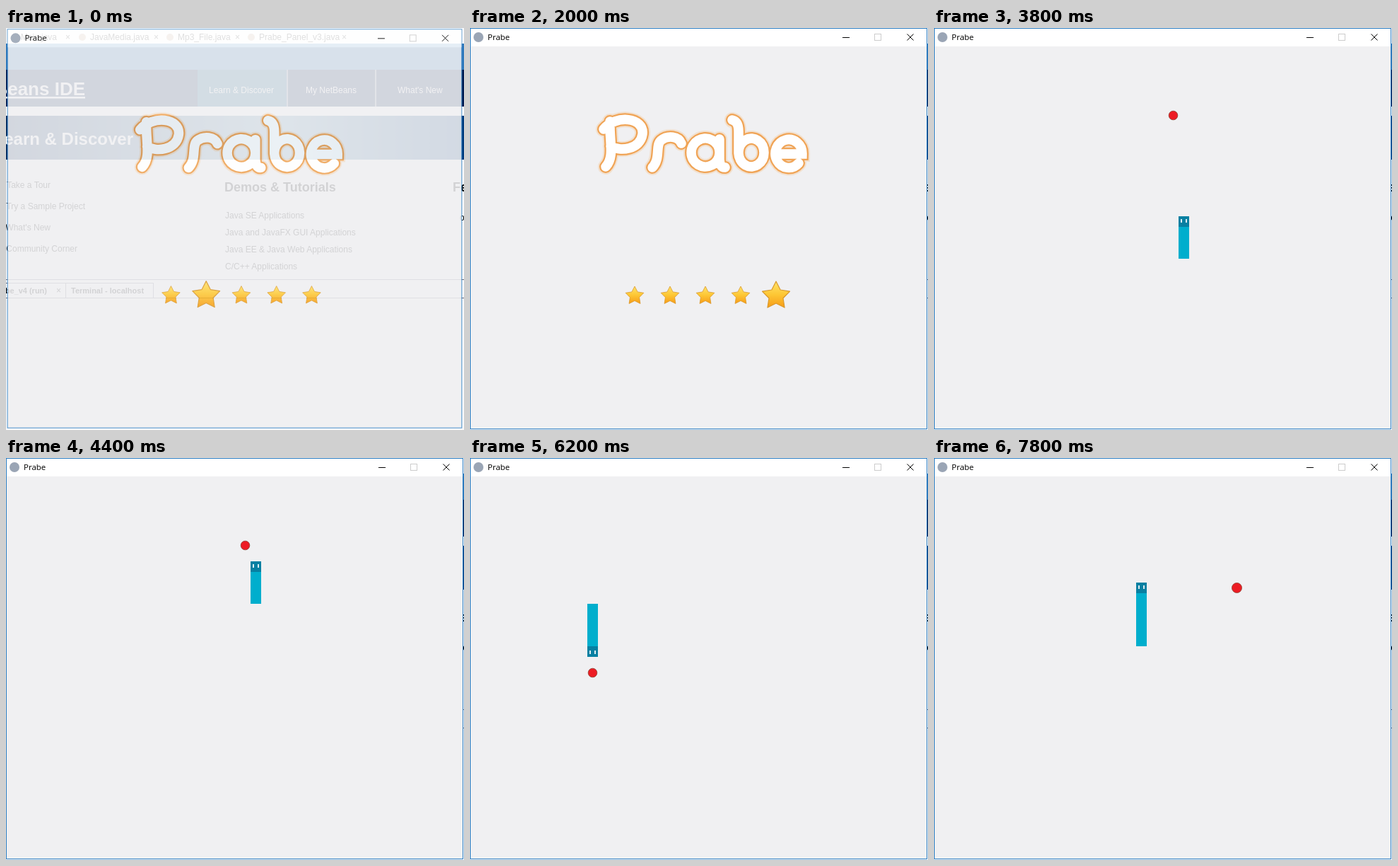
Recreate the animation shown at these times as an HTML page. Size 648 by 568 pixels, loop 8000 ms.

```html
<!DOCTYPE html>
<html lang="en">
<head>
<meta charset="utf-8">
<title>Prabe</title>
<style>
  html, body { margin: 0; width: 100%; height: 100%; overflow: hidden; }
  svg { display: block; width: 648px; height: 568px; }
  #desktop { font: 12px "Liberation Sans", Arial, sans-serif; }
  .bold { font-weight: bold; }
  .caption { font: 11.5px "Open Sans", "Noto Sans", sans-serif; }
  #logo path { fill: none; stroke-linecap: round; stroke-linejoin: round; }
</style>
</head>
<body>
<svg viewBox="0 0 648 568">
  <defs>
    <linearGradient id="gold" x2="0" y2="1">
      <stop offset="0" stop-color="#ffe36a"/>
      <stop offset=".5" stop-color="#fdc735"/>
      <stop offset="1" stop-color="#f79c17"/>
    </linearGradient>
    <linearGradient id="banner">
      <stop offset="0" stop-color="#00265a"/>
      <stop offset=".6" stop-color="#5c93b4"/>
      <stop offset="1" stop-color="#003a7c"/>
    </linearGradient>
    <path id="letters" d="M192 196C205 182 197 160 198 132M189 143C206 122 247 126 244 150C241 172 212 175 199 167
      M258 197C270 185 262 166 270 159C280 151 295 153 299 163
      M353 177A20 20 0 1 1 353 175M353 157V186Q354 198 361 197
      M371 130Q380 132 380 146V177A18 20 0 1 0 380 175
      M434 178H470A19 20 0 1 0 465 191"/>
    <path id="star"/>
  </defs>

  <g id="desktop">
    <rect width="648" height="568" fill="#f7f8fa"/>
    <rect y="22" width="648" height="37" fill="#2f78bb"/>
    <rect y="59" width="648" height="52" fill="#001a50"/>
    <rect x="271" y="59" width="126" height="52" fill="#085a82"/>
    <path d="M398 59v52M523 59v52" stroke="#fff"/>
    <rect y="111" width="648" height="13" fill="#fff"/>
    <rect y="124" width="648" height="62" fill="url(#banner)"/>
    <path d="M0 355.5H648M0 381.5H648M84.5 360V381M208.5 360V381M0 360.5H208" stroke="#667"/>
    <g id="page"></g>
  </g>

  <g id="window">
    <rect x=".5" y=".5" width="646" height="566" fill="#f0f0f2" stroke="#2d7fc4"/>
    <rect x="1" y="1" width="645" height="25" fill="#fff"/>
    <circle cx="12" cy="13" r="7" fill="#9aa5b5"/>
    <text class="caption" x="25" y="17">Prabe</text>
    <g fill="none" stroke="#000">
      <path d="M527 13.5h10M618.5 8.5l9 9M627.5 8.5l-9 9"/>
      <rect x="572.5" y="8.5" width="9" height="9" stroke="#ccc"/>
    </g>
    <g id="splash">
      <g id="logo">
        <use href="#letters" stroke="#f7b15f" stroke-opacity=".25" stroke-width="22" fill="none" stroke-linecap="round"/>
        <use href="#letters" stroke="#f0a456" stroke-width="18" fill="none" stroke-linecap="round"/>
        <use href="#letters" stroke="#fff" stroke-width="13.5" fill="none" stroke-linecap="round"/>
      </g>
      <g id="stars"></g>
    </g>
    <g id="game">
      <circle id="food" r="6.5" fill="#ed1c24" stroke="#8c3a2c" stroke-width=".8"/>
      <g id="body" fill="#00aecd"></g>
      <g id="head">
        <rect x="-7.5" y="-7.5" width="15" height="15" fill="#0780a2"/>
        <path d="M-1.5 -3.5h5M-1.5 3.5h5" stroke="#fff" stroke-width="1.7"/>
      </g>
    </g>
  </g>
</svg>

<script>
const $ = id => document.getElementById(id);
const add = (parent, name, attrs, text = "") => {
  const node = document.createElementNS("http://www.w3.org/2000/svg", name);
  for (const key in attrs) node.setAttribute(key, attrs[key]);
  node.textContent = text;
  return parent.appendChild(node);
};
const label = (text, x, y, attrs = {}) => add($("page"), "text", { x, y, ...attrs }, text);

// Page behind the window
const white = { fill: "#fff" }, bold = { class: "bold" }, end = { "text-anchor": "end" };
label("Main.java", 72, 17, end);
[["JavaMedia.java", 119], ["Mp3_File.java", 243], ["Prabe_Panel_v3.java", 358]].forEach(([name, x]) => {
  label(name, x, 17);
  add($("page"), "circle", { cx: x - 11, cy: 13, r: 5, fill: "#b79a80" });
});
[88, 213, 328, 479].forEach(x => label("×", x - 4, 17));
label("NetBeans IDE", 112, 95, { ...white, ...end, "font-size": 26, class: "bold", "font-family": "Liberation Sans, sans-serif", "text-decoration": "underline" });
label("Learn & Discover", 287, 92, white);
label("My NetBeans", 424, 92, white);
label("What's New", 554, 92, white);
label("Learn & Discover", 180, 165, { ...white, ...bold, ...end, "font-size": 24 });
[["Take a Tour", 63], ["Try a Sample Project", 112], ["What's New", 63], ["Community Corner", 101]]
  .forEach(([text, x], i) => label(text, x, 226 + 30 * i, end));
label("Demos & Tutorials", 309, 231, { ...bold, "font-size": 18 });
["Java SE Applications", "Java and JavaFX GUI Applications", "Java EE & Java Web Applications", "C/C++ Applications"]
  .forEach((text, i) => label(text, 310, 269 + 24 * i));
label("Featured", 632, 231, { ...bold, "font-size": 18 });
label("on", 642, 272);
label("Prabe_v4 (run)", 58, 375, { ...bold, ...end, "font-size": 11 });
label("×", 71, 375);
label("Terminal - localhost", 92, 375, { ...bold, "font-size": 11 });

// Splash stars
const points = Array.from({ length: 10 }, (_, i) => {
  const r = i % 2 ? 10.5 : 20.5, a = (i / 5 - 0.5) * Math.PI;
  return `${r * Math.cos(a)} ${r * Math.sin(a)}`;
});
$("star").setAttribute("d", `M${points.join("L")}Z`);
const stars = Array.from({ length: 5 }, () => add($("stars"), "use", {
  href: "#star", fill: "url(#gold)", stroke: "#d9982c", "stroke-width": 1.2, "stroke-linejoin": "round"
}));

// Route of the head over the grid, in runs of cells
const CELL = 15;
const center = ([col, row]) => [8.5 + CELL * col, 33.5 + CELL * row];
const route = [[10, 23, 0]];
[[1, 0, 13], [0, -1, 17], [-1, 0, 12], [0, 1, 13], [1, 0, 8], [0, -1, 15]].forEach(([dx, dy, count]) => {
  const angle = Math.atan2(dy, dx) * 180 / Math.PI;
  while (count--) {
    const [col, row] = route[route.length - 1];
    route.push([col + dx, row + dy, angle]);
  }
});
const foods = [[22, 6], [11, 18], [28, 10]];
const mealSteps = foods.slice(0, 2).map(([col, row]) => route.findIndex(c => c[0] === col && c[1] === row));
const segments = Array.from({ length: 6 }, () =>
  add($("body"), "rect", { width: CELL, height: CELL, "shape-rendering": "crispEdges" }));

const LOOP = 8000, FRAME = 200, GAME_START = 2400, STEP = 76.5;

function drawSplash(t) {
  const active = (1 + Math.floor(t / 250)) % 5;
  stars.forEach((star, i) => star.setAttribute("transform",
    `translate(${233 + 50 * i} 378.5) scale(${i === active ? 1 : 0.66})`));
}

function drawGame(t) {
  const step = Math.max(3, 7 + Math.floor((t - 2800) / STEP + 0.6));
  const eaten = mealSteps.filter(meal => step >= meal).length;
  segments.forEach((segment, i) => {
    const visible = i < 4 + eaten;
    segment.style.display = visible ? "" : "none";
    if (!visible) return;
    const [x, y] = center(route[step - i]);
    segment.setAttribute("x", x - CELL / 2);
    segment.setAttribute("y", y - CELL / 2);
  });
  $("head").setAttribute("transform", `translate(${center(route[step])}) rotate(${route[step][2]})`);
  $("food").setAttribute("transform", `translate(${center(foods[eaten])})`);
  $("food").setAttribute("r", eaten === 2 ? 7 : 6.3);
}

function draw(now) {
  const t = Math.floor(now % LOOP / FRAME) * FRAME;
  const opening = t === 0, playing = t >= GAME_START;
  $("window").setAttribute("opacity", opening ? 0.88 : 1);
  $("window").setAttribute("transform", opening ? "translate(1.6 1.4) scale(.995)" : "");
  $("splash").style.display = playing ? "none" : "";
  $("game").style.display = playing ? "" : "none";
  if (playing) drawGame(t); else drawSplash(t);
}

const start = performance.now();
(function tick() {
  draw(performance.now() - start);
  requestAnimationFrame(tick);
})();
</script>
</body>
</html>
```
